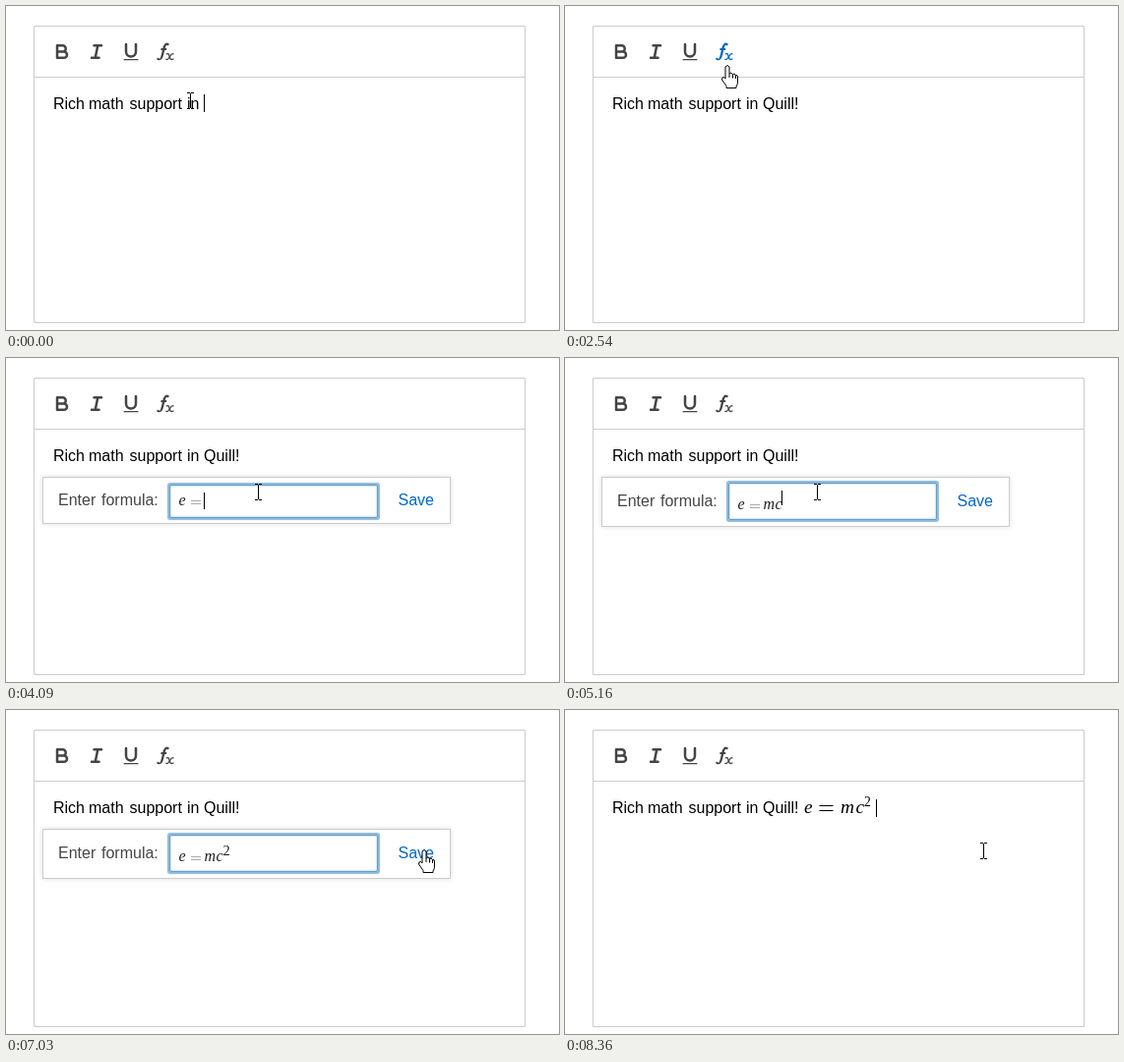
Recreate the animation shown at these times as an HTML page. Size 562x330 px, loop 8.68 s.

```html
<!DOCTYPE html>
<html lang="en">
<head>
<meta charset="utf-8">
<style>
html, body { margin: 0; width: 100%; height: 100%; overflow: hidden; background: #fff; }
div, svg { position: absolute; box-sizing: border-box; }
svg { left: 0; top: 0; }
#tip { left: 37px; top: 121px; width: 415px; border: 1px solid #ccc; box-shadow: 0 0 5px #ddd; background: #fff; }
#field { left: 166px; width: 212px; border: 1px solid #ccc; }
#field.focus { border-color: #709ac0; border-radius: 1px; box-shadow: #8bd 0 0 1px 2px, inset #6ae 0 0 2px 0; }
text { font: 16px "Liberation Sans", Arial, sans-serif; white-space: pre; }
.math text { font-family: "Liberation Serif", serif; font-style: italic; }
.math .up { font-style: normal; }
.icon { fill: none; stroke: #444; stroke-width: 2; stroke-linecap: round; stroke-linejoin: round; }
.icon .fill { fill: #444; stroke: none; }
.icon.hot { stroke: #06c; }
.icon.hot .fill { fill: #06c; }
</style>
</head>
<body>
<div id="tip"></div>
<div id="field"></div>
<svg width="562" height="330">
  <path d="M28.5 20.5H527.5V322.5H28.5ZM28.5 72.5H527.5" fill="none" stroke="#ccc"/>

  <g class="icon" transform="translate(45.75 35.25) scale(1.25)">
    <path d="M5 4H9.5a2.5 2.5 0 0 1 0 5H5ZM5 9h5.5a2.5 2.5 0 0 1 0 5H5Z"/>
  </g>
  <g class="icon" transform="translate(80.75 35.25) scale(1.25)">
    <path d="M7 4H13M5 14H11M8 14L10 4"/>
  </g>
  <g class="icon" transform="translate(115.75 35.25) scale(1.25)">
    <path d="M5 3V9a4 4 0 0 0 8 0V3"/>
    <rect class="fill" x="3" y="15" width="12" height="1" rx=".5"/>
  </g>
  <g class="icon" id="fx" transform="translate(150.75 35.25) scale(1.25)">
    <path class="fill" d="M11.76 2.48a2.56 2.56 0 0 0-3.53.6A7.7 7.7 0 0 0 6.8 6.2C6.1 9.2 5.3 14.7 4.15 14.93a1.55 1.55 0 0 0-1.3-.93A.92.92 0 0 0 2 15.04S1.95 16 4.12 16s3.1-2.7 3.7-5.55L8.78 6.2c.38-1.42.8-2.52 1.3-2.68a1 1 0 0 0 1.02.56.97.97 0 0 0 .66-1.6Z"/>
    <rect class="fill" x="5.15" y="6.2" width="5" height="1.6" rx=".8"/>
    <path stroke-width="1.1" d="M10 10.9Q11.6 10.2 12 11.8L12.8 14.3Q13.3 16 15.4 15"/>
    <path stroke-width="1" d="M15.4 10.9Q14.4 10.4 13.3 12.1L11.6 14.5Q10.6 15.8 9.6 15.2"/>
  </g>

  <text y="105"><tspan x="48">Rich</tspan> <tspan x="84">math</tspan> <tspan x="125.5">support</tspan> <tspan x="184">in</tspan> <tspan x="201" id="word"></tspan></text>

  <g class="math" id="result">
    <text x="243" y="105" font-size="19" style="font-size:19.4px">e</text>
    <path d="M258.5 97.5H272.5M258.5 102.5H272.5" stroke="#000"/>
    <text x="280" y="105" style="font-size:19.4px">m</text>
    <text x="295.5" y="105" style="font-size:19.4px">c</text>
    <text class="up" x="304" y="98" style="font-size:13.6px">2</text>
  </g>

  <g id="label">
    <text x="53" y="150" fill="#444"><tspan>Enter</tspan><tspan x="97">formula:</tspan></text>
    <text x="398.5" y="150" fill="#06c">Save</text>
  </g>
  <g class="math" id="typed" fill="#222">
    <text x="175.5" y="150">e</text>
    <path d="M188 145.5H198M188 148.5H198" stroke="#aaa"/>
    <text x="201.5" y="150">m</text>
    <text x="213.5" y="150">c</text>
    <text class="up" x="220.5" y="143.5" style="font-size:14.4px">2</text>
  </g>

  <rect id="caret" width="1"/>
  <circle id="ring" r="14" fill="none" stroke="#888"/>
  <g id="mouse">
    <path d="M.5-7V8M-3-7.5H0M1-7.5H4M-3 8.5H0M1 8.5H4" fill="none" stroke="#000"/>
    <path d="M0 0V16L4 12.5 6.5 18 9 17 6.5 11.5H11.5Z" fill="#fff" stroke="#000"/>
    <path d="M-2 13V1Q0-2 2 1V8Q4 6 5.5 8.5 7.5 7 8.5 9.5 10.5 9 10.5 11V16Q10.5 19 9 21V22.5H-1V20.5L-5.5 14Q-5.5 11-3.5 11.5ZM2 8V12M5.5 8.5V12.5M8.5 9.5V13" fill="#fff" stroke="#000"/>
  </g>
</svg>
<script>
const LOOP = 8680;
const $ = id => document.getElementById(id);
const show = (el, on) => el.style.display = on ? '' : 'none';

// time, letters shown, caret x (0 = hidden)
const editorKeys = [[0, 0, 201], [530, 0, 0], [680, 1, 213], [910, 3, 226], [1140, 4, 229],
  [1220, 5, 233], [1370, 6, 238], [1620, 6, 242], [2150, 6, 0], [7260, 6, 316], [7810, 6, 0], [8360, 6, 316]];
const formulaKeys = [[0, 0, 0], [3540, 0, 175], [3860, 1, 182], [4090, 2, 201], [4320, 3, 213],
  [4700, 4, 220], [5560, 5, 227], [6020, 5, 0], [6560, 5, 227], [7030, 5, 0]];
const last = (keys, t) => keys.filter(k => k[0] <= t).pop();

// start, step length, step count, target x, target y, arc height
const moves = [[2150, 78, 6, 165, 61, 0], [2600, 90, 2, 165, 45, 0],
  [3140, 77.5, 5, 256, 136, 0], [6400, 78.75, 9, 425, 143, 22]];
const clicks = [[2760, 2840], [3540, 3690], [7180, 7260]];

function pointer(t) {
  let x = 187, y = 96;
  for (const [start, step, count, tx, ty, arc] of moves) {
    if (t < start) break;
    const k = Math.min(1, (Math.floor((t - start) / step + 1e-6) + 1) / count);
    const e = k * k * (3 - 2 * k);
    x += (tx - x) * e;
    y += (ty - y) * e - 4 * arc * e * (1 - e);
  }
  return [Math.round(x), Math.round(y)];
}

const BEAM = 0, ARROW = 1, HAND = 2;
function shape(x, y, open) {
  if (y < 72) return y < 62 && x > 145 && x < 180 ? HAND : ARROW;
  if (!open || y < 121) return BEAM;
  if (x > 397 && x < 437 && y > 134) return HAND;
  return x > 165 && x < 379 && y > 128 ? BEAM : ARROW;
}

function draw(t) {
  const open = t >= 2840 && t < 7260;
  const tall = t >= 5160;
  const focus = open && t >= 3540;

  const [, letters, editorX] = last(editorKeys, t);
  $('word').textContent = 'Quill!'.slice(0, letters);
  show($('result'), t >= 7260);

  for (const id of ['tip', 'field', 'label', 'typed']) show($(id), open);
  $('tip').style.height = (tall ? 51 : 48) + 'px';
  $('field').style.top = (tall ? 127 : 129) + 'px';
  $('field').style.height = (tall ? 38 : 34) + 'px';
  $('field').className = focus ? 'focus' : '';
  $('label').setAttribute('transform', `translate(0 ${tall ? 1 : 0})`);
  $('typed').setAttribute('transform', `translate(0 ${tall ? 4 : 0})`);
  const [, symbols, formulaX] = last(formulaKeys, t);
  [...$('typed').children].forEach((el, i) => show(el, i < symbols));

  const caretX = open ? formulaX : editorX;
  const caretY = open ? (tall ? 135 : 137) : t >= 7260 ? 91 : 90;
  show($('caret'), caretX);
  $('caret').setAttribute('x', caretX);
  $('caret').setAttribute('y', caretY);
  $('caret').setAttribute('height', open ? (tall ? 15 : 17) : 18);

  const [x, y] = pointer(t);
  const kind = shape(x, y, open);
  $('mouse').setAttribute('transform', `translate(${x} ${y})`);
  [...$('mouse').children].forEach((el, i) => show(el, i === kind));
  $('fx').setAttribute('class', kind === HAND && y < 72 ? 'icon hot' : 'icon');
  show($('ring'), clicks.some(([a, b]) => t >= a && t < b));
  $('ring').setAttribute('cx', x - 2);
  $('ring').setAttribute('cy', y - 1);
}

const begin = performance.now();
function tick() {
  draw((performance.now() - begin) % LOOP);
  requestAnimationFrame(tick);
}
tick();
</script>
</body>
</html>
```
